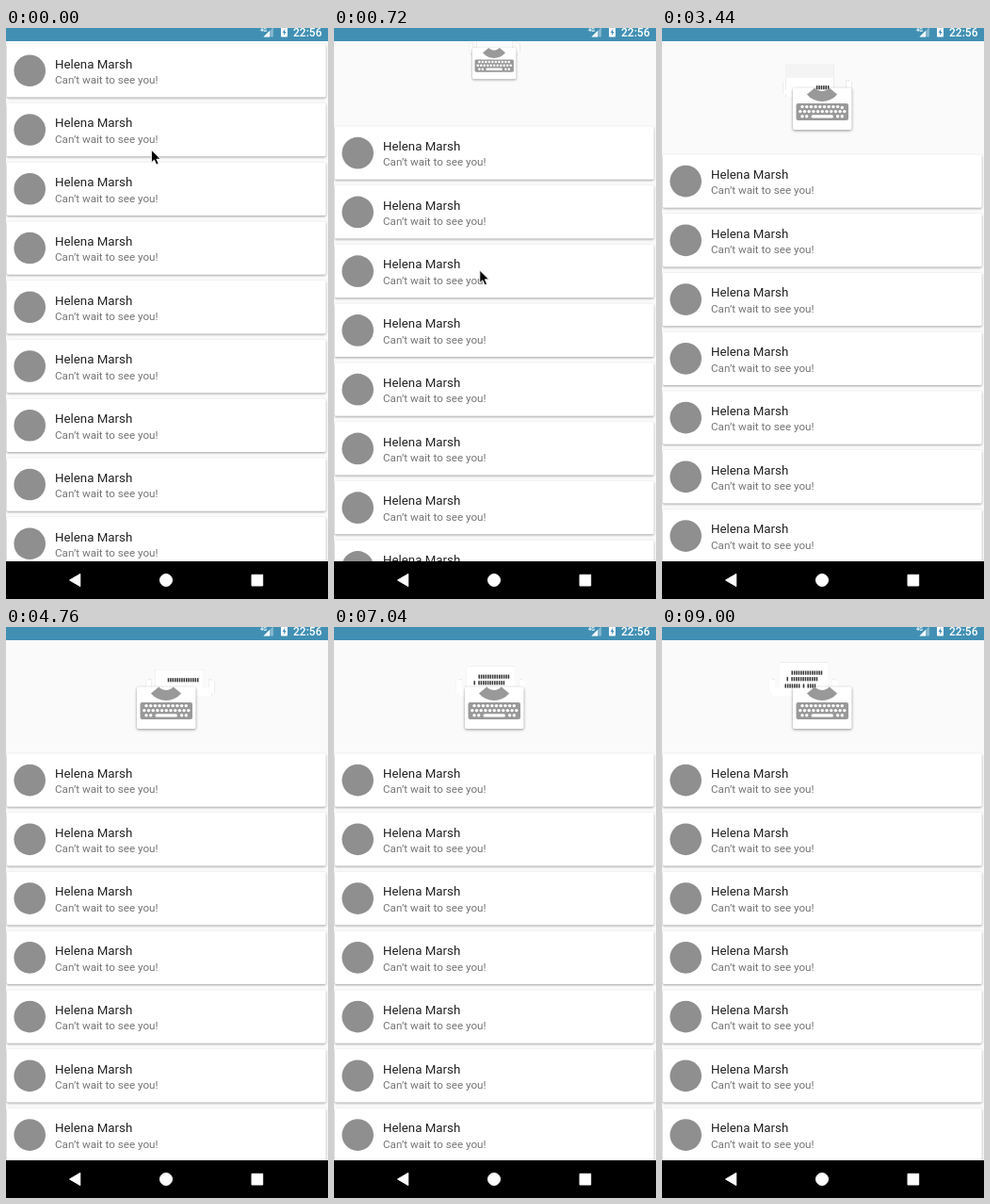
An HTML page for the animation above (9040 ms loop, 342 by 606 pixels).

```html
<!DOCTYPE html>
<html lang="en">
<head>
<meta charset="utf-8">
<title>Pull to refresh</title>
<style>
html, body { margin: 0; width: 100%; height: 100%; overflow: hidden; background: #fafafa; }
svg { display: block; width: 342px; height: 606px; font-family: Roboto, sans-serif; }
.card { fill: #fff; filter: drop-shadow(0 1.1px .8px rgba(0,0,0,.36)); }
.part { fill: #fff; filter: drop-shadow(0 .7px .7px rgba(0,0,0,.3)); }
.body { fill: #fff; filter: drop-shadow(0 1.5px 1.6px rgba(0,0,0,.42)); }
.name { font-size: 13.3px; fill: #212121; }
.note { font-size: 11.65px; fill: #757575; }
</style>
</head>
<body>
<svg viewBox="0 0 342 606">
  <rect width="342" height="606" fill="#fafafa"/>
  <g id="machine">
    <path id="carriage" class="part" d="M-11 57H-8V55.5H-5V64H56V55.5H59V57H62V70H59V73H-8V70H-11Z"/>
    <g id="sheet">
      <rect id="paper" class="part" width="51"/>
      <rect id="band" width="51" fill="#f4f4f4"/>
    </g>
    <rect class="body" x="139" y="63.5" width="62.5" height="44.5" rx="2"/>
    <g id="lines" fill="#333"></g>
    <path d="M153.9 70.5A21 21 0 0 0 186.1 70.5L177.7 63.4A10 10 0 0 1 162.3 63.4Z" fill="#999"/>
    <rect x="142.5" y="80" width="55.5" height="18" rx="2" fill="#999"/>
    <g id="keys" fill="#fff"></g>
    <rect x="158.5" y="92.3" width="23.5" height="3.2" rx="1.6" fill="#fff"/>
  </g>
  <g id="list"></g>
  <rect width="342" height="14" fill="#4190b4"/>
  <g fill="#fff">
    <text x="305" y="9" font-size="12" font-weight="500">22:56</text>
    <text x="270" y="4" font-size="5.5" font-weight="700">4G</text>
    <path d="M284 -1V9.5H273.5Z" opacity=".35"/>
    <path d="M280 3V9.5H273.5Z"/>
    <rect x="292" y="-1" width="7" height="10.5" rx=".8"/>
  </g>
  <path d="M296.2 1L293.6 5H295.2V8L297.6 4H296.2Z" fill="#4190b4"/>
  <rect y="566" width="342" height="40"/>
  <g fill="#fff" stroke="#fff" stroke-linejoin="round">
    <path d="M67.5 586L78.8 579.4V592.6Z"/>
    <circle cx="170" cy="586" r="6.5"/>
    <rect x="261" y="580.3" width="11.7" height="11.7"/>
  </g>
  <path id="cursor" d="M0 0V13.2L3 10.4L5.2 15.4L7.6 14.4L5.4 9.6H9.6Z" stroke="#fff" stroke-width=".8"/>
</svg>
<script>
const LOOP = 9040, PULL = 117.3;
const $ = id => document.getElementById(id);
const seg = (t, a, b) => Math.min(1, Math.max(0, (t - a) / (b - a)));
const ease = u => (1 - Math.cos(Math.PI * u)) / 2;
const lerp = (a, b, u) => a + (b - a) * u;

function add(parent, tag, attrs) {
  const el = document.createElementNS('http://www.w3.org/2000/svg', tag);
  for (const k in attrs) el.setAttribute(k, attrs[k]);
  return parent.appendChild(el);
}
const move = (el, x, y) => el.setAttribute('transform', `translate(${x} ${y})`);

for (let i = 0; i < 9; i++) {
  const g = add($('list'), 'g', { transform: `translate(0 ${i * 62.75})` });
  add(g, 'rect', { class: 'card', x: .7, y: 17, width: 339, height: 56.4, rx: 1.6 });
  add(g, 'circle', { cx: 25.2, cy: 45.3, r: 16.8, fill: '#8f8f8f' });
  add(g, 'text', { class: 'name', x: 52, y: 42.6 }).textContent = 'Helena Marsh';
  add(g, 'text', { class: 'note', x: 52, y: 59 }).textContent = 'Can’t wait to see you!';
}

const keys = [];
function keyRow(y, xs) {
  for (const x of xs) keys.push(add($('keys'), 'circle', { cx: x, cy: y, r: 1.7 }));
}
const span = (x, n) => Array.from({ length: n }, (_, i) => x + i * 4.7);
keyRow(83.6, span(149, 10));
keyRow(88.6, span(146.8, 11));
keyRow(93.8, [...span(149, 2), ...span(186.6, 2)]);

// Each line: carriage return, typing, sheet top and side shift, text margin and pattern.
const rows = [
  { back: [1680, 2240], type: [2600, 4000], top: 38, shift: -8, left: 12.5, text: 'xxxxxxxxxxxxxx' },
  { back: [4280, 4840], type: [4900, 6480], top: 45.5, shift: 0, left: 7.5, text: 'x xxxxxxxxxxxx' },
  { back: [6800, 7320], type: [7640, 9000], top: 37.3, shift: 0, left: 5.5, text: 'xxxxxxx x xxxx' }
];
for (const row of rows) {
  row.g = add($('lines'), 'g', {});
  row.marks = [];
  [...row.text].forEach((c, i) => {
    const x = row.left + i * 2.4;
    if (c === 'x') row.marks.push({ x, el: add(row.g, 'rect', { x, y: -2.1, width: 1.5, height: 4.2 }) });
  });
}

function drawMachine(t) {
  let x = 145, top = 41, shift = 0, pressed = -1;
  for (const row of rows) {
    row.r = ease(seg(t, ...row.back));
    row.s = seg(t, ...row.type);
    x = lerp(x, 161, row.r);
    top = lerp(top, row.top, row.r);
    shift = lerp(shift, row.shift, row.r);
    const step = row.s * 20;
    x -= 1.8 * Math.floor(step);
    if (row.s > 0 && row.s < 1 && step % 1 < .5) pressed = Math.floor(step) * 7 % keys.length;
  }
  move($('carriage'), x, 0);
  move($('sheet'), x + shift, top);
  $('paper').setAttribute('height', 66 - top);
  $('band').setAttribute('height', Math.max(0, 53 - top));
  $('band').setAttribute('opacity', rows[0].r * (1 - rows[1].r));

  rows.forEach((row, i) => {
    const feed = rows.slice(i + 1).reduce((sum, next) => sum + next.r, 0);
    move(row.g, x, (i ? 62.5 : 63.2) - 7.3 * feed);
    const strike = i ? 169 : 176;
    for (const m of row.marks) {
      const typed = row.s === 1 || row.s > 0 && x + m.x < strike;
      const covered = i === 0 && feed === 0 && x + m.x < 162.5;
      m.el.setAttribute('visibility', typed && !covered ? 'visible' : 'hidden');
    }
  });
  keys.forEach((key, i) => move(key, 0, i === pressed ? .8 : 0));
}

function drawPull(t) {
  const u = seg(t, 480, 1160);
  const p = 1 - (1 - u) ** 3.12;
  move($('list'), 0, PULL * p);
  $('machine').setAttribute('transform',
    `translate(170 ${108.5 - 211 * (1 - p)}) scale(${p}) translate(-170 -108.5)`);

  let cx = 154.5 + u;
  let cy = lerp(129.5, 76, ease(seg(t, 40, 360))) + 351 * (1 - (1 - u) ** 1.66);
  if (t >= 1440) [cx, cy] = [41, 397];
  else if (t >= 1400) [cx, cy] = [119.5, 402];
  move($('cursor'), cx, cy);
  $('cursor').setAttribute('visibility', t < 1480 ? 'visible' : 'hidden');
}

function frame() {
  const t = performance.now() % LOOP;
  drawPull(t);
  drawMachine(t);
  requestAnimationFrame(frame);
}
frame();
</script>
</body>
</html>
```
